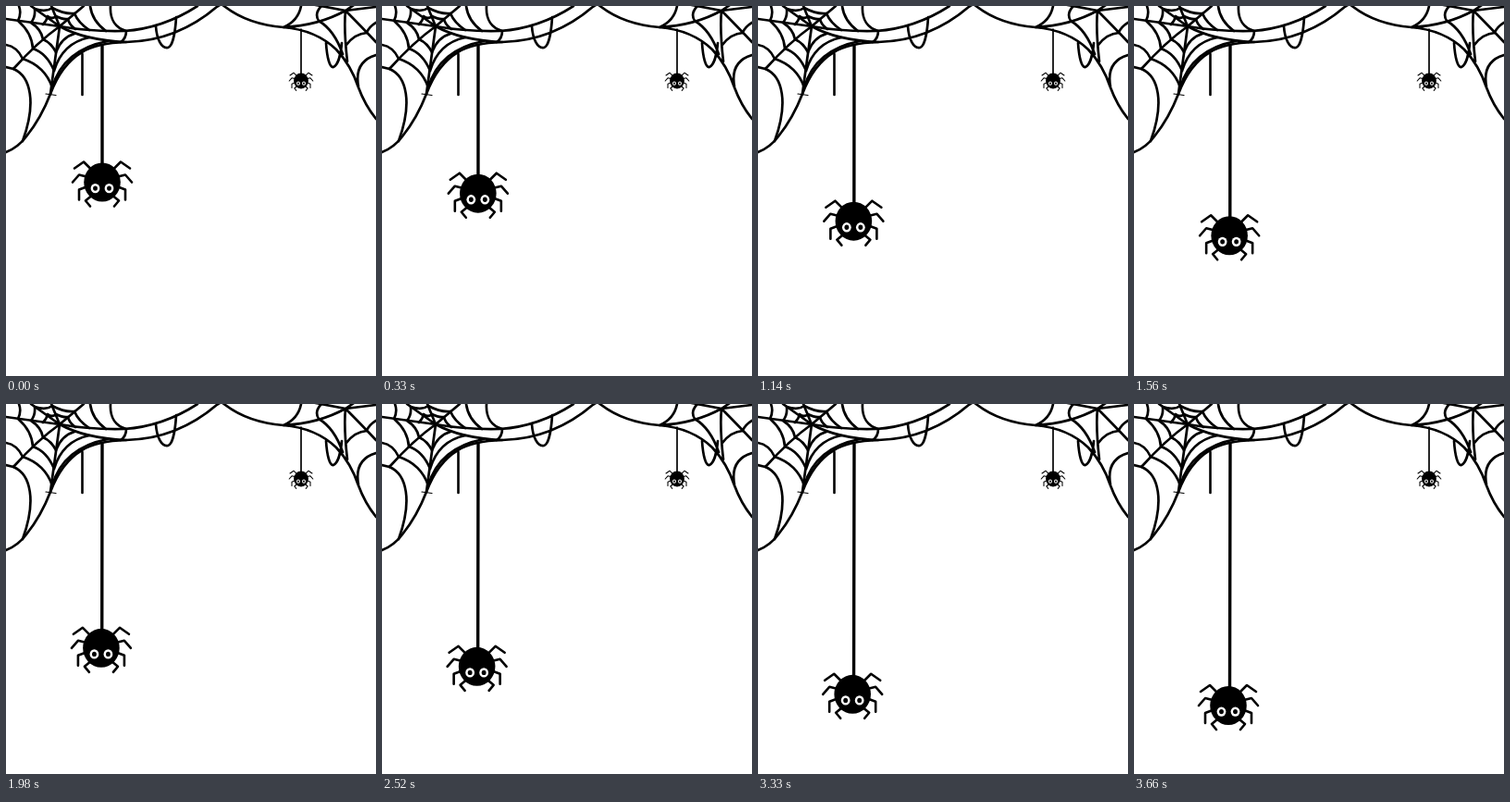
Animation of 400 by 400 pixels, one loop 4.59 s. Source, as an HTML page with a canvas:

```html
<!DOCTYPE html>
<html lang="en">
<head>
<meta charset="utf-8">
<title>Hanging spider</title>
<style>
  html, body { margin: 0; width: 100%; height: 100%; overflow: hidden; background: #fff; }
  canvas { display: block; width: 400px; height: 400px; }
</style>
</head>
<body>
<canvas id="stage" width="400" height="400"></canvas>
<script>
const ctx = document.getElementById('stage').getContext('2d');
const LOOP = 4590, DROP = 3660, STEP = 30;

const leftFrame = new Path2D(`
  M0 158 Q13 153 22 141 Q38 121 48 95 Q60 63 82 50 Q98 40 130 39
  Q185 38 229 0
  M58 22 Q92 28 128 27 Q170 24 207 0
  M162 22 C163 36 168 46 175 45 C180 44 183 29 184 12`);

const leftSpokes = new Path2D(`
  M58 22 L0 14 M58 22 L27 0 M58 22 L49 0 M58 22 L84 0
  M58 22 Q34 39 8 68 L0 66 M58 22 Q53 58 48 95
  M58 22 Q85 37 130 39`);

const leftRings = new Path2D(`
  M8 68 C27 76 33 105 18 146
  M18 57 Q42 65 50 88 M29 46 Q44 51 52 70 M40 36 Q49 40 54 50
  M50 88 Q62 47 110 38 M52 70 Q61 40 90 34 M54 50 Q60 34 74 30
  M0 42 Q12 44 18 57 M13 16 Q28 29 29 46 M27 18 Q38 25 40 36
  M13 16 Q17 8 14 0 M27 18 Q32 12 31 3 M40 20 Q44 16 45 11
  M31 3 Q43 7 50 2 M45 11 Q50 15 54 11 Q62 15 67 14
  M50 2 Q63 9 74 8 M67 14 Q68 20 75 25 M74 8 Q78 18 90 26
  M91 0 Q93 16 108 27 M113 0 C112 15 119 24 130 27 Q130 35 124 39`);

const rightWeb = new Path2D(`
  M229 0 L233 -2 L237 1 Q262 20 300 23 Q335 26 357 47 Q373 64 381 88 Q388 107 400 122
  M367 5 Q338 21 300 23 M367 5 L330 -2 M367 5 L382 -5
  M367 5 Q365 25 369 60 M367 5 Q382 20 400 39 M367 5 L400 1
  M319 0 Q316 16 300 23 M341 0 Q333 8 338 16
  M338 16 Q355 26 364 52
  M368 42 Q377 30 390 29 Q392 23 400 18
  M381 87 Q376 60 400 53
  M346 40 C347 56 350 67 354 66 C359 64 362 52 363 40`);

const legs = [
  [-11, -13, -20, -22, -30, -15],
  [-17, -6, -25, -8, -32, 0],
  [-17, 5, -25, 8, -25, 19],
  [-12, 15, -18, 20, -13, 26]
];

function line(x1, y1, x2, y2, width) {
  ctx.lineWidth = width;
  ctx.beginPath();
  ctx.moveTo(x1, y1);
  ctx.lineTo(x2, y2);
  ctx.stroke();
}

function oval(x, y, rx, ry, color) {
  ctx.fillStyle = color;
  ctx.beginPath();
  ctx.ellipse(x, y, rx, ry, 0, 0, Math.PI * 2);
  ctx.fill();
}

function spider(x, y, scale) {
  ctx.save();
  ctx.translate(x, y);
  ctx.scale(scale, scale);
  ctx.lineWidth = 2.6;
  for (const side of [-1, 1]) {
    for (const [x1, y1, x2, y2, x3, y3] of legs) {
      ctx.beginPath();
      ctx.moveTo(x1 * side, y1);
      ctx.lineTo(x2 * side, y2);
      ctx.lineTo(x3 * side, y3);
      ctx.stroke();
    }
  }
  oval(0, 0, 19.8, 21, '#000');
  for (const side of [-1, 1]) {
    oval(side * 7.5, 6.6, 4.9, 5.2, '#fff');
    oval(side * 7.5, 6.6, 2.4, 2.7, '#000');
  }
  ctx.restore();
}

function draw(now) {
  const time = Math.floor((now % LOOP) / STEP) * STEP;
  const progress = Math.min(time / DROP, 1);
  const x = 104 - 2 * progress;
  const y = 190.5 + 135.5 * progress;

  ctx.fillStyle = '#fff';
  ctx.fillRect(0, 0, 400, 400);
  ctx.strokeStyle = '#000';
  ctx.lineCap = ctx.lineJoin = 'round';
  ctx.lineWidth = 2.7;
  for (const web of [leftFrame, leftSpokes, leftRings, rightWeb]) ctx.stroke(web);

  line(43, 95, 54, 96.5, 1.2);
  line(82.5, 52, 82.5, 96, 2.6);
  line(319, 25, 319, 74, 1.7);
  spider(319, 81, 0.4);
  line(104, 43, 104 - 0.5 * progress, y - 18, 3.4);
  spider(x, y, 1);
  requestAnimationFrame(draw);
}
requestAnimationFrame(draw);
</script>
</body>
</html>
```
